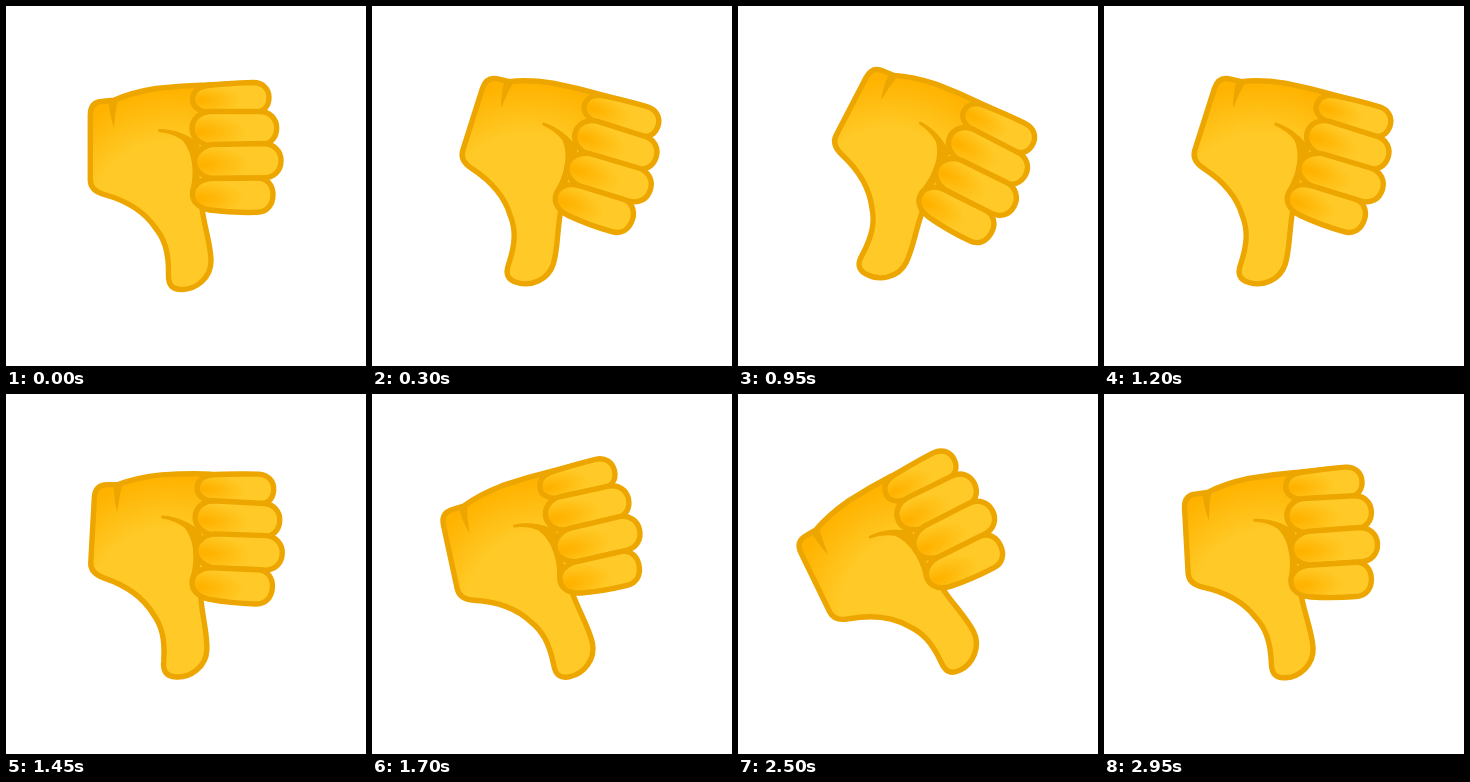
Recreate the animation shown at these times as an HTML page. Size 360 px wide and 360 px high, loop 3000 ms.

```html
<!DOCTYPE html>
<html lang="en">
<head>
<meta charset="utf-8">
<title>Thumbs down</title>
<style>
  html, body { margin: 0; width: 100%; height: 100%; overflow: hidden; background: #fff; }
  svg { display: block; width: 100vw; height: 100vh; }
</style>
</head>
<body>
<svg viewBox="0 0 360 360">
  <defs>
    <radialGradient id="palm" gradientUnits="userSpaceOnUse" cx="165" cy="215" r="140">
      <stop offset=".56" stop-color="#ffca28"/>
      <stop offset=".93" stop-color="#ffb300"/>
    </radialGradient>
    <radialGradient id="finger" cx=".1" cy=".6" r=".56">
      <stop offset=".12" stop-color="#ffb300"/>
      <stop offset="1" stop-color="#ffca28"/>
    </radialGradient>
  </defs>
  <g id="hand" stroke="#eda600" stroke-width="5.4" stroke-linejoin="round">
    <path fill="url(#palm)" d="M84.300 109 C84.300 100 89 95.500 97 95.200 L108 94.300 Q125 86.500 150 82.500 Q176 79.500 200 79
      L246 77 L240 205 Q212 206 196 202 C198 220 205 239 205 255 C205 272 190 283.500 176 283.500
      C166 283.500 162 279 162.500 268 C162.800 246 158.500 233 149.500 222 C138 205 120 194.500 98 188.500
      Q84.300 184.500 84.300 174 Z"/>
    <g fill="#eda600" stroke="none">
      <path d="M103 94 L112 92 Q109 106 108 122 Q103 107 103 94Z"/>
      <path d="M153 123 C169 123 182 129 193 137 L195 150 L193 182 L184 186
        C189 167 187 146 176 134 Q166 127 153 126 Q151 124 153 123Z"/>
    </g>
    <g fill="url(#finger)">
      <path d="M202 79.500 Q226 77 247 76.500 C257 76.500 263 83 263 91.500 C263 101 257 106.500 247 106.500 L204 106.500 C193 106 186.500 100 186.500 94 C186.500 86 192 80.500 202 79.500Z"/>
      <path d="M204 105.500 L254 105.500 C264 105.500 270.700 113 270.700 122 C270.700 132 264 138.500 254 139 L204 139.500 C193 138 186 131 186 122.500 C186 113 194 106 204 105.500Z"/>
      <path d="M207 138.500 L258 137.500 C268 138 275 145 275 154.500 C275 165 268 172 257 172 L207 172.500 C196 171 188.500 164 188.500 155.500 C188.500 147 197 139.500 207 138.500Z"/>
      <path d="M205 172.500 L252 172 C261 172 267 179 267 188.500 C267 199 261 206.300 251 206.300 Q226 207 204 204 C193 202 186.500 196 186.500 188 C186.500 179 195 173 205 172.500Z"/>
    </g>
  </g>
</svg>
<script>
  const LOOP = 3000, STEP = 50, SWING = 30;
  const hand = document.getElementById('hand');

  function draw(now) {
    const time = Math.floor((now % LOOP) / STEP) * STEP;
    const angle = SWING * Math.sin(2 * Math.PI * time / LOOP);
    hand.setAttribute('transform', `rotate(${angle} 183 180)`);
  }

  let start;
  function tick(now) {
    start ??= now;
    draw(now - start);
    requestAnimationFrame(tick);
  }
  draw(0);
  requestAnimationFrame(tick);
</script>
</body>
</html>
```
